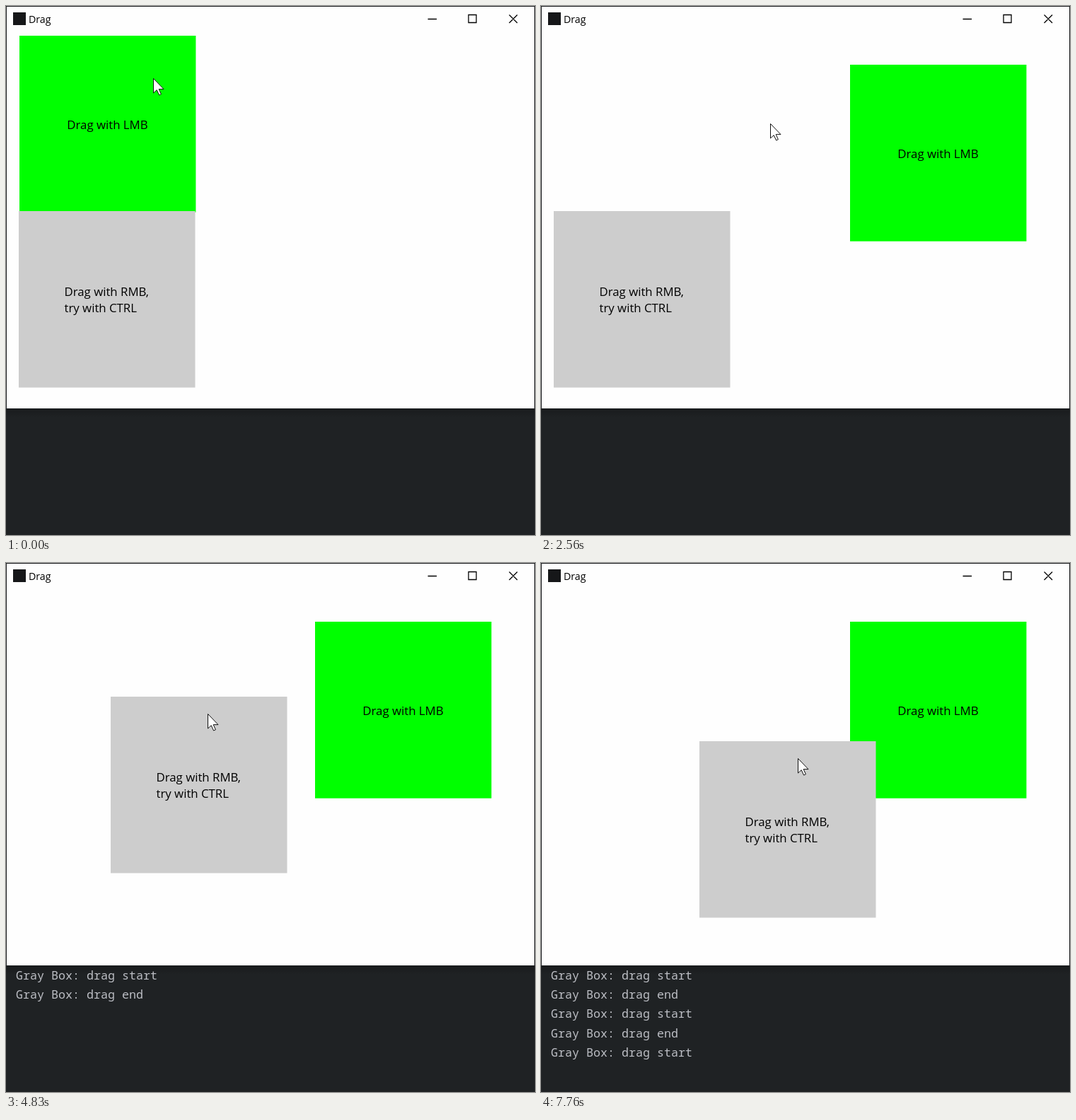
Write an HTML page that moves like this. It is 748 px wide and 748 px high and loops after 8 s.

```html
<!DOCTYPE html>
<html lang="en">
<head>
<meta charset="utf-8">
<title>Drag</title>
<style>
  html, body { margin: 0; width: 100%; height: 100%; overflow: hidden; background: #1f2224; }
  svg { display: block; width: 748px; height: 748px; }
  .ui { font: 16.8px "Open Sans", "Noto Sans", sans-serif; fill: #000; }
  .title { font-size: 14.2px; }
  .log { font: 16.67px "Noto Sans Mono", "DejaVu Sans Mono", monospace; fill: #bcbec4; white-space: pre; }
  .icon { fill: none; stroke: #000; stroke-width: 1.3; }
</style>
</head>
<body>
<svg viewBox="0 0 748 748">
  <defs>
    <linearGradient id="shade" x2="0" y2="1">
      <stop offset="0" stop-color="#000" stop-opacity=".2"/>
      <stop offset="1" stop-color="#000" stop-opacity="0"/>
    </linearGradient>
  </defs>
  <rect width="748" height="748" fill="#1f2224"/>
  <rect y="570" width="748" height="12" fill="url(#shade)"/>
  <g id="console" class="log"></g>

  <rect width="748" height="570" fill="#1c1e20"/>
  <rect x="1" y="1" width="746" height="568" fill="#fefefe"/>
  <rect x="10" y="9" width="18" height="18" fill="#161719"/>
  <text class="ui title" x="32" y="24">Drag</text>
  <path class="icon" d="M596.5 18.5H609M654 12.5h11v11h-11zM711.5 12.5l11.5 11.5M723 12.5L711.5 24"/>

  <g id="green">
    <rect width="249.4" height="249.7" fill="#0f0"/>
    <text class="ui" x="67.3" y="132">Drag with LMB</text>
  </g>
  <g id="gray">
    <rect width="249.5" height="249.5" fill="#cdcdcd"/>
    <text class="ui" x="64.5" y="120">Drag with RMB,</text>
    <text class="ui" x="64.5" y="143">try with CTRL</text>
  </g>
  <path id="cursor" d="M.5 .5V21L5.2 16.7 8.6 24 11.4 22.7 8.2 15.6H15z" fill="#fff" stroke="#111" stroke-width="1"/>
</svg>
<script>
const LOOP = 8000, TICK = 1000 / 30;
const LAG = 5;          // ticks a box trails the pointer
const LOG_DELAY = 11;   // ticks from press to the "start" line
const HOME = [208, 102];
const $ = id => document.getElementById(id);

// pointer strokes: ticks, end point, ease-out power, sideways bend
const strokes = [
  { from: 29, to: 54, end: [542, 194], power: 1.08, bend: [0, 32] },
  { from: 54, to: 63, end: [626, 143], power: 1.3 },
  { from: 72, to: 98, end: [155, 314], power: 2.04, bend: [-297, -82] },
  { from: 104, to: 121, end: [259, 119], power: 1, bend: [0, -114] },
  { from: 121, to: 129, end: [285, 213], power: 1.6, bend: [18, 0] },
  { from: 165, to: 169, end: [201, 251], power: 1.5 },
  { from: 169, to: 176, end: [173, 264], power: 0.6 },
  { from: 222, to: 229, end: [363, 276], power: 2.4 }
];

// each box follows the pointer only between its own first press and last release
const boxes = [
  { el: $("green"), grab: [189, 60], from: 29, to: 63 },
  { el: $("gray"), grab: [137, 24], from: 104, to: 240 }
];

const lines = [
  [104 + LOG_DELAY, "start"], [145, "end"],
  [165 + LOG_DELAY, "start"], [193, "end"],
  [222 + LOG_DELAY, "start"]
].map(([tick, word], i) => {
  const el = document.createElementNS("http://www.w3.org/2000/svg", "text");
  el.setAttribute("x", 14);
  el.setAttribute("y", 588.6 + 27.4 * i);
  el.textContent = "Gray Box: drag " + word;
  $("console").append(el);
  return { tick, el };
});

function pointer(k) {
  let pos = HOME;
  for (const { from, to, end, power, bend = [0, 0] } of strokes) {
    if (k <= from) break;
    const u = Math.min(1, (k - from) / (to - from));
    const e = 1 - (1 - u) ** power;
    pos = pos.map((p, i) => p + (end[i] - p) * e + bend[i] * 2 * e * (1 - e));
  }
  return pos;
}

function place(el, pos) {
  el.setAttribute("transform", `translate(${pos.map(Math.round)})`);
}

function draw(now) {
  const k = Math.floor((now % LOOP + 7) / TICK);
  place($("cursor"), pointer(k));
  for (const { el, grab, from, to } of boxes) {
    const at = Math.max(from, Math.min(to, k - LAG));
    place(el, pointer(at).map((v, i) => v - grab[i]));
  }
  for (const { tick, el } of lines) el.style.display = k >= tick ? "" : "none";
}

const start = performance.now();
function loop() {
  draw(performance.now() - start);
  requestAnimationFrame(loop);
}
loop();
</script>
</body>
</html>
```
